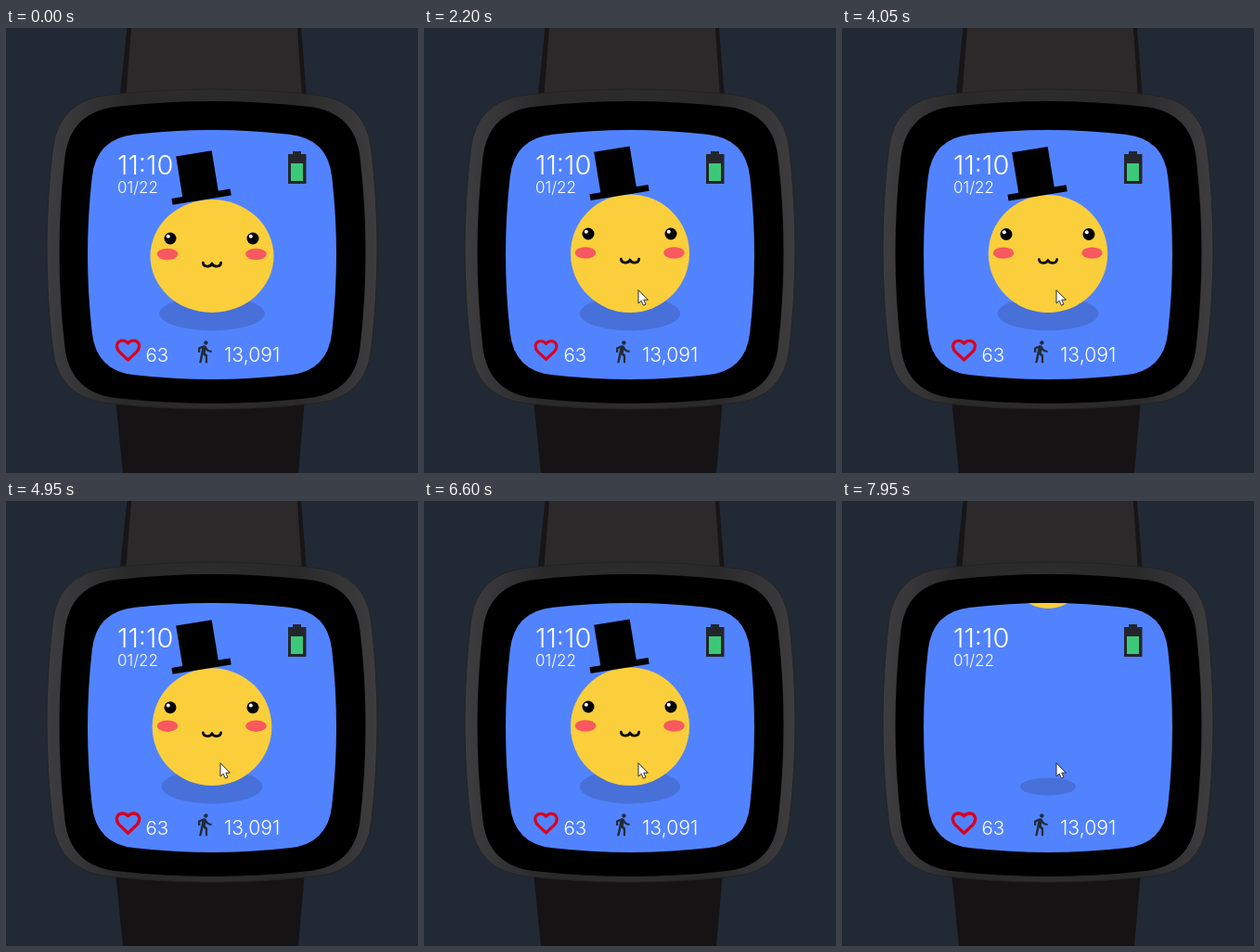
An HTML page with a canvas for the animation above (8 s loop, 444x480 px).

```html
<!DOCTYPE html>
<html lang="en">
<head>
<meta charset="utf-8">
<title>Watch face</title>
<style>
html, body { margin: 0; width: 100%; height: 100%; overflow: hidden; background: #212935; }
canvas { display: block; }
</style>
</head>
<body>
<canvas id="stage" width="444" height="480"></canvas>
<script>
const ctx = document.getElementById('stage').getContext('2d');
const LOOP = 8000, BREATH = 880, CROUCH = 7220, LAUNCH = 7650;
const TAU = Math.PI * 2;
const clamp = x => Math.max(0, Math.min(1, x));
const mix = (a, b, k) => a + (b - a) * k;
const smooth = x => { x = clamp(x); return x * x * (3 - 2 * x); };

const walker = new Path2D('M13.5 5.5c1.1 0 2-.9 2-2s-.9-2-2-2-2 .9-2 2 .9 2 2 2zM9.8 8.9L7 23h2.1l1.8-8 2.1 2v6h2v-7.5l-2.1-2 .6-3C14.8 12 16.8 13 19 13v-2c-1.9 0-3.5-1-4.3-2.4l-1-1.6c-.4-.6-1-1-1.7-1-.3 0-.5.1-.8.1L6 8.3V13h2V9.6z');
const heart = new Path2D('M0 10.5L-9 2C-12-1-12.2-5-11-7C-9-10.7-3-11 0-7C3-11 9-10.7 11-7C12.2-5 12-1 9 2Z');
const mouth = new Path2D('M-9.7-1.8C-9 3.2-1.5 3.2 0-1C1.5 3.2 9 3.2 9.7-1.8');
const arrow = new Path2D('M0 0V14L3.2 11.2L5.4 16.2L8 15L5.8 10.2H10Z');

// A rounded square whose sides bow outwards.
function cushion(cx, cy, rx, ry) {
  const side = 0.62, end = 0.965, corner = 0.933;
  const path = new Path2D();
  const px = x => cx + x * rx, py = y => cy + y * ry;
  const curve = (a, b, x, y) => path.quadraticCurveTo(px(a), py(b), px(x), py(y));
  path.moveTo(px(-1), py(0));
  for (let i = 0, x = -1, y = 0; i < 4; i++) {
    const nx = -y, ny = x;
    curve(x + nx * side / 2, y + ny * side / 2, x * end + nx * side, y * end + ny * side);
    curve((x + nx) * corner, (y + ny) * corner, nx * end + x * side, ny * end + y * side);
    curve(nx + x * side / 2, ny + y * side / 2, nx, ny);
    [x, y] = [nx, ny];
  }
  path.closePath();
  return path;
}
const body = cushion(222, 238.5, 178, 172.5);
const bezel = cushion(222.5, 242, 165, 163);
const screen = cushion(222, 244.5, 134, 134.5);

function gradient(x0, y0, x1, y1, ...colors) {
  const g = ctx.createLinearGradient(x0, y0, x1, y1);
  colors.forEach((c, i) => g.addColorStop(i / (colors.length - 1), c));
  return g;
}
function fill(color, path) {
  ctx.fillStyle = color;
  ctx.fill(path);
}
function rect(color, x, y, w, h) {
  ctx.fillStyle = color;
  ctx.fillRect(x, y, w, h);
}
function ellipse(color, x, y, rx, ry = rx) {
  ctx.fillStyle = color;
  ctx.beginPath();
  ctx.ellipse(x, y, rx, ry, 0, 0, TAU);
  ctx.fill();
}
function stroke(color, width, path) {
  ctx.strokeStyle = color;
  ctx.lineWidth = width;
  ctx.lineCap = ctx.lineJoin = 'round';
  ctx.stroke(path);
}
function at(x, y, scale, draw) {
  ctx.save();
  ctx.translate(x, y);
  ctx.scale(scale, scale);
  draw();
  ctx.restore();
}
function text(value, x, y, size) {
  ctx.font = `300 ${size}px Inter, Roboto, sans-serif`;
  ctx.fillStyle = '#fff';
  ctx.fillText(value, x, y);
}

function drawWatch() {
  rect('#212935', 0, 0, 444, 480);
  fill('#171516', new Path2D('M130.5 0H318L325 90H121Z'));
  fill('#2b292a', new Path2D('M135 0H314L320 90H128Z'));
  fill('#151314', new Path2D('M118 400H322L315 480H126Z'));
  fill(gradient(44, 0, 400, 0, '#3d3d3f', '#29292a', '#2d2c2d', '#29292a', '#3d3d3f'), body);
  stroke('#232324', 1, body);
  fill('#000', bezel);
  fill('#5283ff', screen);
}

function drawHat(y) {
  ctx.save();
  ctx.translate(210.5, y);
  ctx.rotate(-0.162);
  rect('#000', -32, -3, 64, 7);
  rect('#000', -20, -47, 39, 46);
  ctx.restore();
}

function drawBuddy(t) {
  const idle = (1 + Math.cos(TAU * t / BREATH)) / 2;
  const crouch = smooth((t - CROUCH) / 260);
  const squash = mix(idle, 1.15, crouch);
  const nod = mix(idle, 0.6, crouch);
  const leap = clamp((t - LAUNCH) / 300);
  const rise = 1 - (1 - leap) ** 1.7;
  const stretch = smooth(leap * 2);

  ellipse('#4770d9', 222, 308, mix(54.2 + 2.6 * squash, 30, rise), mix(18.5, 9.5, rise));

  ctx.save();
  ctx.translate(222, 307 - 191 * rise);
  ctx.scale(mix(1, 0.84, stretch), mix(1, 1.28, stretch));
  ctx.translate(-222, -307);
  const top = 179.5 + 5.5 * squash;
  ellipse('#facf3b', 222, (top + 307) / 2, 64 + 2.5 * squash, (307 - top) / 2);
  const eyeY = 222 + 5 * nod;
  for (const x of [177, 266]) {
    ellipse('#000', x, eyeY, 6.5);
    ellipse('#fff', x - 2.2, eyeY - 2.2, 2);
  }
  for (const x of [174, 269.5]) ellipse('#f8585f', x, 242.5 + 1.5 * nod, 11.3, 6.2);
  at(222, 251 + 4 * nod, 1, () => stroke('#000', 2.7, mouth));
  drawHat(177 + 4.7 * nod);
  ctx.restore();
}

function drawStats(t) {
  text('11:10', 120, 158, 29);
  text('01/22', 120, 178, 17);
  text('63', 150.5, 360, 20.5);
  text('13,091', 235, 360, 21.2);

  rect('#22262c', 309, 133, 9, 4);
  rect('#22262c', 304, 136, 19.5, 32);
  rect('#3bc979', 307, 146, 13, 19);

  const beat = 1 + 0.05 * Math.cos(TAU * (t - 850) / 1000);
  at(131.5, 347.3, beat, () => stroke('#d8001f', 3.2, heart));
  at(200.3, 335.5, 1.12, () => fill('#222b38', walker));
}

function drawCursor(t) {
  if (t < 1050) return;
  const k = smooth((t - 1050) / 500);
  at(mix(239, 231, k), mix(481, 283, k), 1, () => {
    fill('#fff', arrow);
    stroke('#2b2b38', 1, arrow);
  });
}

function frame() {
  const t = Math.floor(performance.now() % LOOP / 50) * 50;
  drawWatch();
  ctx.save();
  ctx.clip(screen);
  drawBuddy(t);
  drawStats(t);
  ctx.restore();
  drawCursor(t);
  requestAnimationFrame(frame);
}
frame();
</script>
</body>
</html>
```
